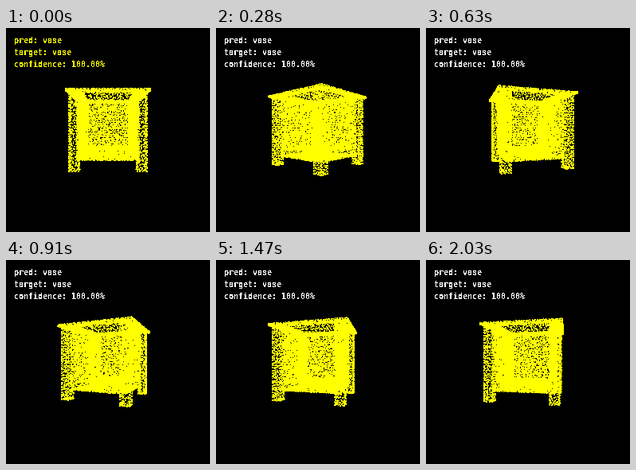
Animation of 256 by 256 pixels, one loop 2100 ms. Source, as a matplotlib script:

```python
from itertools import product

import matplotlib.pyplot as plt
import numpy as np
from matplotlib.animation import FuncAnimation

SIZE = 256
FRAMES = 30
INTERVAL = 70
CAMERA = 219       # distance from the turning axis
RADIUS = 0.98      # dot radius in pixels
SPACING = 2.75     # mean gap between dots
YELLOW = (255, 255, 0)

# Heights of the planter's parts
TOP, LIP, FLOOR, BASE, FOOT = 42, 40, -23, -32, -42.5
# Half widths
INNER, OUTER, POST_IN, POST_OUT, RIM = 29.5, 34, 30.5, 40, 43

rng = np.random.default_rng(7)


def scatter(u0, u1, v0, v1):
    """Evenly spread, slightly shaken dots on a rectangle."""
    nu = max(2, round((u1 - u0) / SPACING) + 1)
    nv = max(2, round((v1 - v0) / SPACING) + 1)
    u, v = np.meshgrid(np.linspace(u0, u1, nu), np.linspace(v0, v1, nv))
    u[1::2] += SPACING / 2
    u += rng.uniform(-0.35, 0.35, u.shape) * SPACING
    v += rng.uniform(-0.35, 0.35, v.shape) * SPACING
    return np.clip(u, u0, u1).ravel(), np.clip(v, v0, v1).ravel()


def stack(x, y, z):
    return np.column_stack(np.broadcast_arrays(x, y, z))


def front(z, x0, x1, y0, y1):
    x, y = scatter(x0, x1, y0, y1)
    return stack(x, y, z)


def side(x, z0, z1, y0, y1):
    z, y = scatter(z0, z1, y0, y1)
    return stack(x, y, z)


def flat(y, x0, x1, z0, z1):
    x, z = scatter(x0, x1, z0, z1)
    return stack(x, y, z)


def ring(y, inner, outer):
    """One mitred quarter of a flat square ring."""
    p = flat(y, -outer, outer, inner, outer)
    return p[np.abs(p[:, 0]) <= p[:, 2]]


def turn(p, angle):
    c, s = np.cos(angle), np.sin(angle)
    x, y, z = p.T
    return stack(x * c + z * s, y, z * c - x * s)


def quarter():
    a, b = POST_IN, POST_OUT
    return np.vstack([
        front(OUTER, -a, a, BASE, LIP),
        front(INNER, -INNER, INNER, FLOOR, TOP),
        front(a, a, b, FOOT, LIP),
        front(b, a, b, FOOT, LIP),
        side(a, a, b, FOOT, LIP),
        side(b, a, b, FOOT, LIP),
        flat(FOOT, a, b, a, b),
        ring(TOP, INNER, RIM),
        ring(LIP, OUTER, RIM),
        front(RIM, -RIM, RIM, LIP, TOP),
    ])


def planter():
    parts = [turn(quarter(), k * np.pi / 2) for k in range(4)]
    parts.append(flat(FLOOR, -INNER, INNER, -INNER, INNER))
    parts.append(flat(BASE, -OUTER, OUTER, -OUTER, OUTER))
    return np.vstack(parts)


def render(points):
    """Perspective view with hard-edged dots of constant size."""
    x, y, z = points.T
    scale = CAMERA / (CAMERA - z)
    xy = np.column_stack([SIZE / 2 + x * scale, SIZE / 2 - y * scale])
    cell = np.floor(xy).astype(int)
    image = np.zeros((SIZE, SIZE, 3), np.uint8)
    for step in product((-1, 0, 1), repeat=2):
        px = cell + step
        hit = np.hypot(*(px + 0.5 - xy).T) < RADIUS
        image[px[hit, 1], px[hit, 0]] = YELLOW
    return image


cloud = planter()

fig = plt.figure(figsize=(SIZE / 72, SIZE / 72), dpi=72, facecolor="black")
ax = fig.add_axes([0, 0, 1, 1])
ax.axis("off")
view = ax.imshow(render(cloud), extent=(0, SIZE, SIZE, 0),
                 interpolation="nearest", aspect="auto")
ax.set(xlim=(0, SIZE), ylim=(SIZE, 0))

lines = ["pred: vase", "target: vase", "confidence: 100.00%"]
labels = [
    ax.text(9.5, 19 + 15 * i, line, family="DejaVu Sans Mono", weight="bold",
            size=10, va="baseline", antialiased=False)
    for i, line in enumerate(lines)
]


def draw(i):
    view.set_data(render(turn(cloud, 2 * np.pi * i / FRAMES)))
    for label in labels:
        label.set_color("yellow" if i == 0 else "white")
    return [view, *labels]


anim = FuncAnimation(fig, draw, frames=FRAMES, interval=INTERVAL,
                     repeat=True, repeat_delay=0)
plt.show()
```
